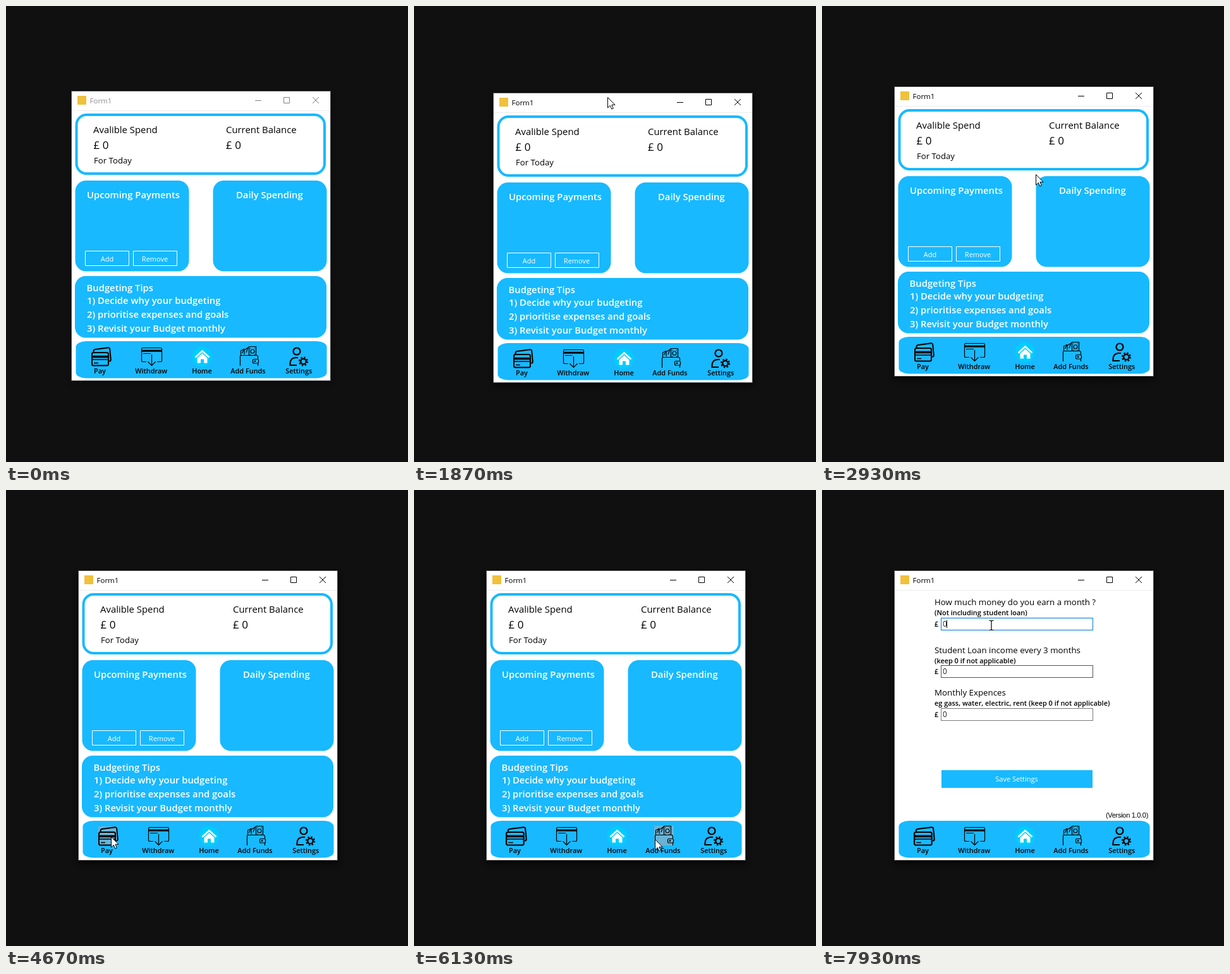
Write an HTML page that moves like this. It is 636 px wide and 721 px high and loops after 8000 ms.

```html
<!DOCTYPE html>
<html lang="en">
<head>
<meta charset="utf-8">
<title>Budget app</title>
<style>
html, body { margin: 0; width: 100%; height: 100%; overflow: hidden; background: #101010; }
svg { display: block; width: 636px; height: 721px; font-family: "Open Sans", "Noto Sans", sans-serif; }
.blue { fill: #18b9ff; }
.big { font-size: 14.9px; }
.sum { font-size: 17px; }
.mid { font-size: 13.3px; }
.small { font-size: 10.9px; font-weight: 600; }
.bold { font-size: 14.8px; font-weight: 600; fill: #fff; }
.btn { font-size: 11px; fill: #fff; text-anchor: middle; }
.mark { text-anchor: middle; }
.line { fill: none; stroke: #000; }
.box { fill: #fff; stroke: #7a7a7a; }
.val { font-size: 11.8px; fill: #1c2430; }
</style>
</head>
<body>
<svg viewBox="0 0 636 721">
  <defs>
    <filter id="soft" x="-10%" y="-10%" width="120%" height="120%"><feGaussianBlur stdDeviation="5"/></filter>
    <clipPath id="disc"><circle cx="322" cy="303.5" r="43"/></clipPath>
  </defs>
  <rect width="636" height="721" fill="#101010"/>
  <g id="win">
    <rect id="shadow" x="114" y="131" width="412" height="460" filter="url(#soft)"/>
    <rect x="114.5" y="127.5" width="410" height="458" fill="#fff" stroke="#484848"/>
    <path d="M115 158.5H524M523.5 158V585" stroke="#ececec" fill="none"/>
    <rect x="124" y="135" width="14" height="14" fill="#efc13c"/>
    <text id="title" x="143.5" y="147" font-size="11.5">Form1</text>
    <path id="controls" fill="none" d="M405 142.5H415M450.5 137.5H459.5V146.5H450.5ZM496 137L506 147M506 137L496 147"/>

    <g id="home">
      <rect x="122.5" y="165" width="392.5" height="93" rx="16" fill="#fff" stroke="#18b9ff" stroke-width="4"/>
      <text class="big" x="149" y="194">Avalible Spend</text>
      <text class="big" x="359" y="194">Current Balance</text>
      <text class="sum" x="149.5" y="219">£ 0</text>
      <text class="sum" x="359" y="219">£ 0</text>
      <text x="150" y="242" font-size="13.2">For Today</text>
      <g class="blue">
        <rect x="120.5" y="269" width="180" height="143.5" rx="17"/>
        <rect x="338.5" y="269" width="180" height="143.5" rx="17"/>
        <rect x="120" y="420" width="398" height="97.500" rx="17"/>
      </g>
      <text class="bold" x="139" y="297">Upcoming Payments</text>
      <text class="bold" x="375" y="297">Daily Spending</text>
      <path d="M136.5 380.5H205.5V403.5H136.5ZM212.5 380.5H281.5V403.5H212.5Z" fill="none" stroke="#fff"/>
      <text class="btn" x="171" y="397">Add</text>
      <text class="btn" x="246.5" y="397">Remove</text>
      <text class="bold" x="138.5" y="444">Budgeting Tips</text>
      <text class="bold" x="139" y="464">1) Decide why your budgeting</text>
      <text class="bold" x="139" y="486">2) prioritise expenses and goals</text>
      <text class="bold" x="139" y="508">3) Revisit your Budget monthly</text>
    </g>

    <g id="pay">
      <circle cx="322" cy="303.5" r="43" fill="#fafafa"/>
      <g clip-path="url(#disc)">
        <path d="M303 350L303.5 297Q303.5 294 306.5 294H338.5Q341.5 294 341.5 297L342.5 350Z" fill="#3388f0"/>
        <path d="M305.5 300.5H339.5L340 339H305Z" fill="#fff"/>
        <path d="M305.3 316L340 338V339H305Z" fill="#dfeefc"/>
        <path d="M318 297.5H326" stroke="#b9d8fa" stroke-width="1.5"/>
      </g>
      <circle cx="322" cy="303.5" r="43" fill="none" stroke="#2f80f0" stroke-width="2.2"/>
      <text x="175" y="394" font-family="Inter, sans-serif" font-size="25.7" letter-spacing="-.15" fill="#8c8c90">Hold Near Reader to Pay</text>
    </g>

    <g id="settings">
      <text class="mid" x="178" y="182">How much money do you earn a month ?</text>
      <text class="small" x="178" y="198">(Not including student loan)</text>
      <text class="mid" x="178" y="258">Student Loan income every 3 months</text>
      <text class="small" x="178" y="274">(keep 0 if not applicable)</text>
      <text class="mid" x="178" y="325">Monthly Expences</text>
      <text class="small" x="178" y="341">eg gass, water, electric, rent (keep 0 if not applicable)</text>
      <g id="fields"></g>
      <path id="caret" d="M197.5 206V218" stroke="#000"/>
      <rect class="blue" x="189" y="443" width="239" height="28"/>
      <text class="btn" x="308" y="461">Save Settings</text>
      <text x="449" y="518" font-family="Liberation Sans, Arial, sans-serif" font-size="11" letter-spacing="-.3">(Version 1.0.0)</text>
    </g>

    <rect class="blue" x="121.5" y="523" width="397" height="58.500" rx="16" ry="9"/>
    <g id="hots"></g>
    <g id="cards" class="line" stroke-width="2">
      <path d="M149.5 540.5V539Q149.5 536.5 152 536L172.5 533.2Q174.8 533 175.2 535L176.8 552Q177 554 174.5 555"/>
      <rect x="147" y="541" width="26" height="20.5" rx="2.5"/>
      <path d="M147 547.5H173" stroke-width="3.5"/>
      <path d="M147 552H173M150 557.5H157" stroke-width="1.6"/>
    </g>
    <g class="line">
      <path d="M233 555.5H227.5Q225.5 555.5 225.5 553.5V535.5Q225.5 533.5 227.5 533.5H255.5Q257.5 533.5 257.5 535.5V553.5Q257.5 555.5 255.5 555.5H250" stroke-width="1.2"/>
      <path d="M226 538.2H257" stroke-width="3"/>
      <path d="M228 542.5H240M241.5 544V561M235.5 555.5L241.5 561.5L247.5 555.5" stroke-width="1.2"/>
    </g>
    <circle cx="321" cy="547.5" r="16" fill="#00cdfd"/>
    <path d="M310.5 548.5L321.5 538.5L332.5 548.5" fill="none" stroke="#fff" stroke-width="2.6"/>
    <path d="M313.5 549.5L321.5 542.3L329.5 549.5V557.5H324V551.5H319V557.5H313.5Z" fill="#fff"/>
    <g class="line" stroke-width="1.2">
      <path d="M381.5 562V546.5Q381.5 545.5 383 545.5H407.5Q409.5 545.5 409.5 548V551M409.5 558V562"/>
      <rect x="401.5" y="551.5" width="9" height="6.5" rx="2"/>
      <circle cx="405" cy="554.7" r=".8"/>
      <path d="M382.5 545V538L387.5 535.5L384.5 542M388 544V537L394 533L391 541M395.5 545V531.5H406.5V545"/>
      <circle cx="401" cy="539" r="3"/>
      <path d="M397 534H398.5M403.5 534H405M397 544H398.5M403.5 544H405"/>
    </g>
    <g class="line" stroke-width="2.2">
      <circle cx="471" cy="539" r="5.5"/>
      <path d="M471 561H460.5V558Q461 549.5 469 549H473"/>
      <circle cx="481.5" cy="555" r="4.2"/>
      <circle cx="481.5" cy="555" r="6.2" stroke-dasharray="2.435" stroke-width="2.6"/>
    </g>
    <g class="small mark">
      <text x="159.5" y="574">Pay</text>
      <text x="240.7" y="574">Withdraw</text>
      <text x="321" y="574">Home</text>
      <text x="394" y="574">Add Funds</text>
      <text x="474.3" y="574">Settings</text>
    </g>
  </g>
  <path id="arrow" d="M.5 .5V17L4.3 13.4L6.8 19L9.3 17.9L6.9 12.3H12Z" fill="#fff" stroke="#000"/>
  <path id="beam" d="M-3.5 -7.5H-1L0 -6.5L1 -7.5H3.5M0 -6.5V6.5M-3.5 7.5H-1L0 6.5L1 7.5H3.5" fill="none" stroke="#000" stroke-width="1.2"/>
</svg>
<script>
const LOOP = 8000, STEP = 1000 / 15;
const el = id => document.getElementById(id);

// [step, x, y] with linear moves in between
const POINTER = [
  [7, 434, 3], [10, 400, 28], [14, 335, 78], [19, 290, 119], [21, 286, 138], [23, 284, 141],
  [26, 297, 143], [28, 306, 144], [30, 303, 139], [32, 298, 133], [34, 320, 127], [37, 320, 127],
  [39, 322, 117], [44, 338, 266], [47, 380, 325], [50, 349, 345], [56, 298, 450], [63, 212, 548],
  [64, 204, 549], [68, 166, 548], [75, 166, 548], [81, 240, 558], [84, 355, 556], [86, 322, 552],
  [87, 322, 552], [100, 476, 552], [105, 476, 552], [111, 390, 385], [115, 310, 290], [118, 268, 214]
];
const WINDOW = [[23, -11, 7], [26, 2, 9], [28, 11, 10], [30, 6, 4], [32, 0, 0]];
const HOTS = [
  { area: [146, 532, 31, 30], tint: "#69b3d6" },
  { area: [225, 532, 33, 30], tint: "#219ad6" },
  { area: [305, 532, 32, 31], tint: "#69b3d6" },
  { area: [380, 531, 31, 31], tint: "#69b3d6" },
  { area: [458, 532, 31, 30], tint: "#80bbd6" }
];
const FIELDS = [202, 277, 345];

function along(keys, k) {
  const i = keys.findIndex(p => p[0] > k);
  if (i < 0) return keys[keys.length - 1].slice(1);
  if (i === 0) return keys[0].slice(1);
  const a = keys[i - 1], b = keys[i], u = (k - a[0]) / (b[0] - a[0]);
  return [a[1] + (b[1] - a[1]) * u, a[2] + (b[2] - a[2]) * u];
}

const inside = ([x, y], [l, t, w, h]) => x >= l && x <= l + w && y >= t && y <= t + h;
const place = (id, [x, y]) => el(id).setAttribute("transform", `translate(${Math.round(x)} ${Math.round(y)})`);
const show = (id, on) => el(id).style.display = on ? "" : "none";

el("hots").innerHTML = HOTS.map(({ area: [x, y, w, h], tint }) =>
  `<rect x="${x}" y="${y}" width="${w}" height="${h}" fill="${tint}"/>`).join("");
el("fields").innerHTML = FIELDS.map(y =>
  `<text class="small" x="178" y="${y + 14}">£</text>
   <rect class="box" x="188.5" y="${y + .5}" width="240" height="19"/>
   <text class="val" x="191" y="${y + 14}">0</text>`).join("");
const hots = [...el("hots").children];
const boxes = [...document.querySelectorAll(".box")];

function draw(t) {
  const k = Math.floor((t + 4) / STEP) % 120;
  const active = k >= 23, typing = k >= 119;
  const page = k < 71 ? "home" : k < 88 ? "pay" : k < 103 ? "home" : "settings";
  const tip = along(POINTER, k);

  place("win", along(WINDOW, k));
  ["home", "pay", "settings"].forEach(p => show(p, p === page));
  el("shadow").setAttribute("opacity", active ? .65 : .3);
  el("title").setAttribute("fill", active ? "#000" : "#8f8f8f");
  el("controls").setAttribute("stroke", active ? "#000" : "#808080");
  el("cards").setAttribute("transform", k >= 88 ? "translate(161.5 547) scale(1.06 1) translate(-161.5 -547)" : "");

  hots.forEach((r, i) => r.style.display = inside(tip, HOTS[i].area) ? "" : "none");
  const over = FIELDS.map(y => page === "settings" && inside(tip, [188, y, 241, 20]));
  boxes.forEach((b, i) => {
    const fading = i === 1 && k > 115;
    b.style.stroke = typing && i === 0 ? "#0078d7" : over[i] ? "#171717" : fading ? "#555" : "#7a7a7a";
  });
  show("caret", typing);

  const text = over.some(Boolean);
  show("arrow", k >= 7 && !text);
  show("beam", text);
  place("arrow", tip);
  place("beam", tip);
}

const start = performance.now();
function tick() {
  draw((performance.now() - start) % LOOP);
  requestAnimationFrame(tick);
}
draw(0);
requestAnimationFrame(tick);
</script>
</body>
</html>
```
